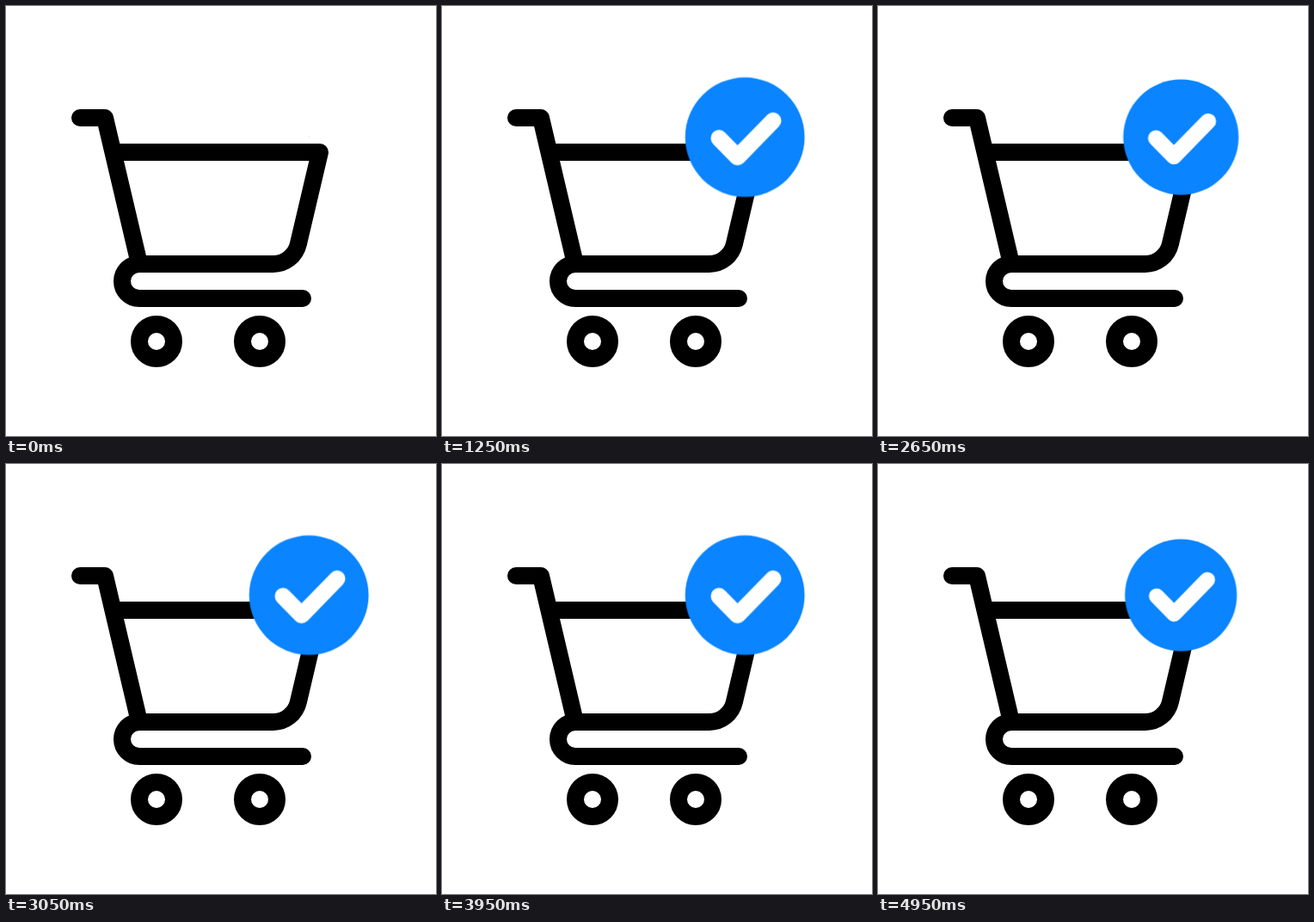
An HTML page that plays this animation: 500 by 500 pixels, repeating every 5000 ms.

```html
<!DOCTYPE html>
<html lang="en">
<head>
<meta charset="utf-8">
<title>Cart with check badge</title>
<style>
  html, body { margin: 0; width: 100%; height: 100%; overflow: hidden; background: #fff; }
  svg { display: block; width: 100%; height: 100%; }
  .line { fill: none; stroke-width: 20; stroke-linecap: round; stroke-linejoin: round; }
  .cart { stroke: #000; }
  .tick { stroke: #fff; stroke-width: 16.4; }
  .badge { animation: pulse 5s infinite; }

  /* One pop, then a beat every 900 ms: steady rise, slowing fall */
  @keyframes pulse {
    0% { transform: scale(0); animation-timing-function: linear; }
    5% { transform: scale(1.64); animation-timing-function: cubic-bezier(.333, .667, .667, 1); }
    15%, 33%, 51%, 69%, 87% { transform: scale(1); animation-timing-function: linear; }
    21%, 39%, 57%, 75% { transform: scale(1.378); animation-timing-function: cubic-bezier(.333, .667, .667, 1); }
    93% { transform: scale(1.378); animation-timing-function: cubic-bezier(.333, .471, .667, .804); }
    100% { transform: scale(1.066); }
  }
</style>
</head>
<body>
<svg viewBox="0 0 500 500">
  <g class="line cart">
    <path d="M86 130H115L155 300"/>
    <path d="M130 170H365L339.9 276.8A30 30 0 0 1 310.6 300H155A20 20 0 0 0 155 340H345"/>
    <circle cx="175" cy="390" r="20"/>
    <circle cx="295" cy="390" r="20"/>
  </g>
  <g transform="translate(352.2 152.5)">
    <g class="badge">
      <circle r="59.5" fill="#0a84ff"/>
      <path class="line tick" d="M-25.8 1L-7.3 19.9L28.1 -16.4"/>
    </g>
  </g>
</svg>
</body>
</html>
```
